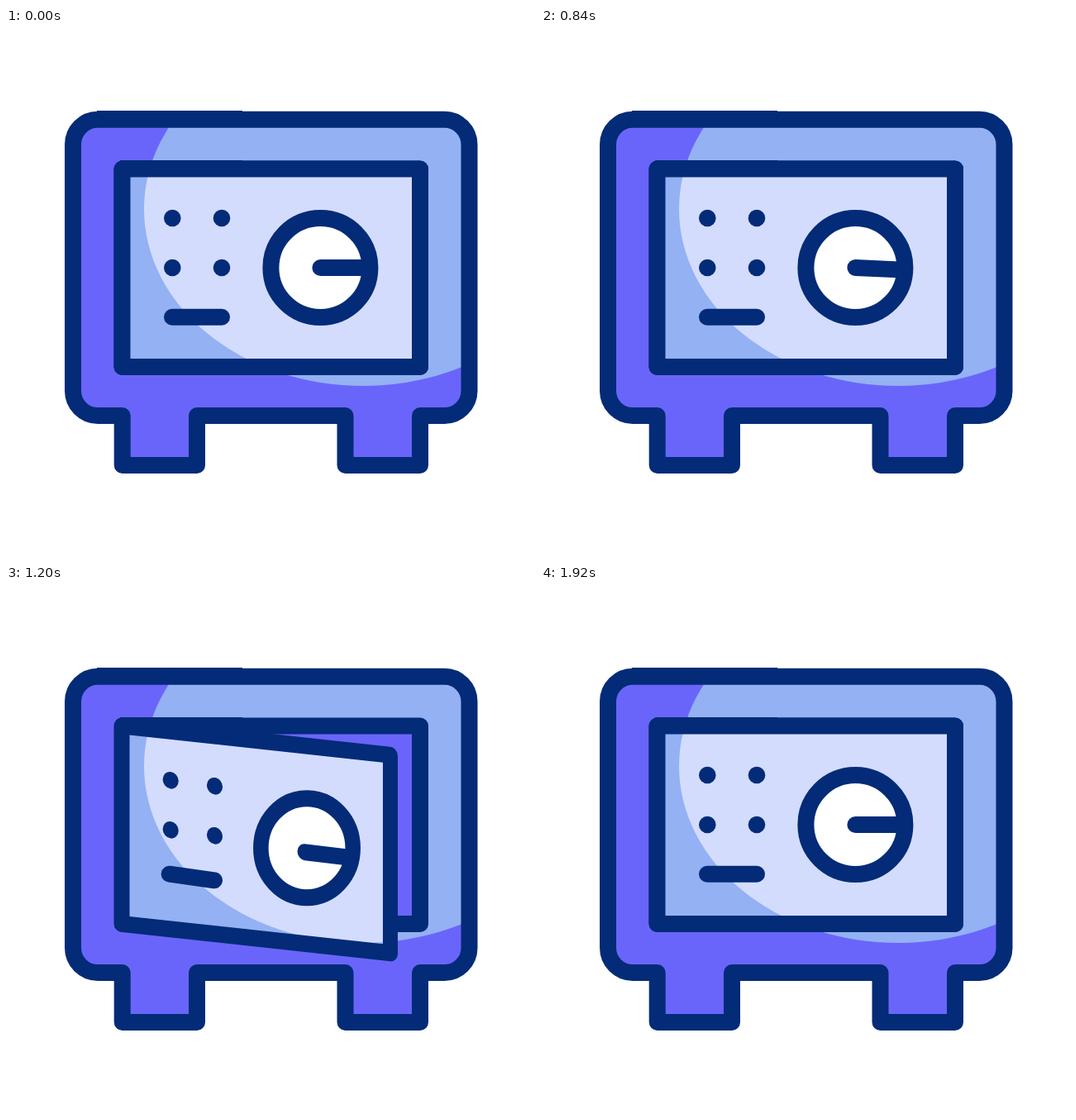
Recreate the animation shown at these times as an HTML page. Size 640 px wide and 640 px high, loop 2000 ms.

```html
<!DOCTYPE html>
<html lang="en">
<head>
<meta charset="utf-8">
<title>Safe</title>
<style>
  html, body { margin: 0; width: 100%; height: 100%; overflow: hidden; background: #fff; }
  svg { display: block; width: 100%; height: 100%; }
  .line { fill: none; stroke: #032b77; stroke-width: 20; stroke-linecap: round; stroke-linejoin: round; }
  .edge { fill: none; stroke: #032b77; stroke-width: 1; }
</style>
</head>
<body>
<svg viewBox="0 0 640 640">
  <defs>
    <clipPath id="bodyClip"><path class="body"/></clipPath>
    <clipPath id="doorClip"><rect class="door" x="140.5" y="170.5" width="360.5" height="239.5"/></clipPath>
  </defs>

  <path class="body" fill="#6a65fa"/>
  <g clip-path="url(#bodyClip)"><ellipse cx="432" cy="219" rx="265" ry="214" fill="#93b1f3"/></g>
  <path class="body line"/>
  <path class="edge" id="lip"/>

  <rect class="line" x="140.5" y="170.5" width="360.5" height="239.5" style="fill:#6a65fa"/>
  <path class="edge" d="M138 160.5H286"/>

  <g clip-path="url(#doorClip)">
    <rect x="120" y="150" width="400" height="330" fill="#93b1f3"/>
    <ellipse cx="432" cy="219" rx="265" ry="214" fill="#d3dcfd"/>
  </g>
  <rect class="door line" x="140.5" y="170.5" width="360.5" height="239.5"/>

  <g id="dots"></g>
  <path class="line" id="bar"/>
  <circle class="line" id="ring" r="60" style="fill:#fff"/>
  <path class="line" id="hand" d="M0 0H58"/>
</svg>
<script>
const LOOP = 2000, NAVY = '#032b77', YELLOW = '#fecb50';
const AJAR = 37, WIDE = 42;   // how far the door's free edge has moved in

const $ = id => document.getElementById(id);
const all = s => [...document.querySelectorAll(s)];
const mix = (a, b, p) => a + (b - a) * p;
const ease = p => (1 - Math.cos(Math.PI * p)) / 2;

// Eased value at time t through [time, value] pairs
function track(t, keys) {
  if (t <= keys[0][0]) return keys[0][1];
  for (let i = 1; i < keys.length; i++) {
    const [t0, a] = keys[i - 1], [t1, b] = keys[i];
    if (t < t1) return mix(a, b, ease((t - t0) / (t1 - t0)));
  }
  return keys[keys.length - 1][1];
}

const TOP = [[880, 0], [1000, 11], [1120, -9.5], [1180, 0]];
const BASE = [[880, 0], [1000, 13.3], [1120, 0]];
const DIAL = [[0, 0], [293, -60], [587, 60], [880, 0]];
const DOOR = [[880, 0], [1080, 47], [1160, AJAR], [1680, AJAR], [1760, 47], [1920, 0]];

const dots = [0, 1, 2, 3].map(i => {
  const c = document.createElementNS('http://www.w3.org/2000/svg', 'circle');
  c.setAttribute('r', 10.3);
  $('dots').append(c);
  return c;
});

function bodyPath(top, base) {
  const y = 110.8 + top, b = 469 + base, f = 529 + base * .24;
  const up = 141 - y, down = b - 439;
  return `M111 ${y}H530.5A30 ${up} 0 0 1 560.5 141V439A30 ${down} 0 0 1 530.5 ${b}` +
    `H501V${f}H410.5V${b}H231V${f}H140.7V${b}H111A30 ${down} 0 0 1 81 439V141A30 ${up} 0 0 1 111 ${y}Z`;
}

function draw(t) {
  const top = track(t, TOP), swing = track(t, DOOR);
  const d = bodyPath(top, track(t, BASE));
  all('.body').forEach(e => e.setAttribute('d', d));
  $('lip').setAttribute('d', `M110 ${100.5 + top}H286`);

  // closed, ajar and wide values of one coordinate
  const pose = (a, b, c) => swing < AJAR
    ? mix(a, b, swing / AJAR)
    : mix(b, c, (swing - AJAR) / (WIDE - AJAR));
  const place = (el, sx, skew, x, y, more = '') =>
    el.setAttribute('transform', `matrix(${sx} ${skew} 0 1 ${x} ${y})${more}`);

  const sx = pose(1, .9, .885), skew = pose(0, .098, .109);
  all('.door').forEach(e => place(e, sx, skew, 140.5 * (1 - sx), -140.5 * skew));

  const squeeze = pose(1, .928, .925);
  dots.forEach((c, i) => {
    const right = i % 2, row = i > 1 ? 60 : 0;
    const x = right ? pose(261, 252.5, 252.3) : pose(201.3, 199.2, 199);
    const y = right ? pose(230, 243.3, 246) : pose(230, 236.3, 239);
    place(c, squeeze, skew, x, y + row);
    const lit = i === 0 || i === 3 ? t >= 160 && t < 320 : t >= 400 && t < 560;
    c.setAttribute('fill', lit ? YELLOW : NAVY);
  });

  $('bar').setAttribute('d',
    `M${pose(201, 197.7, 197.5)} ${pose(349.8, 349.7, 355)}` +
    `L${pose(261, 252, 251.7)} ${pose(349.8, 357.3, 362.7)}`);

  place($('ring'), squeeze, 0, pose(380.4, 364, 361), pose(290, 318.2, 321));
  place($('hand'), pose(1, .9, .885), pose(0, .108, .112),
    pose(380.4, 361.5, 358.5), pose(290, 323.3, 328.5), ` rotate(${track(t, DIAL)})`);
}

const start = performance.now();
function tick() {
  draw((performance.now() - start) % LOOP);
  requestAnimationFrame(tick);
}
tick();
</script>
</body>
</html>
```
